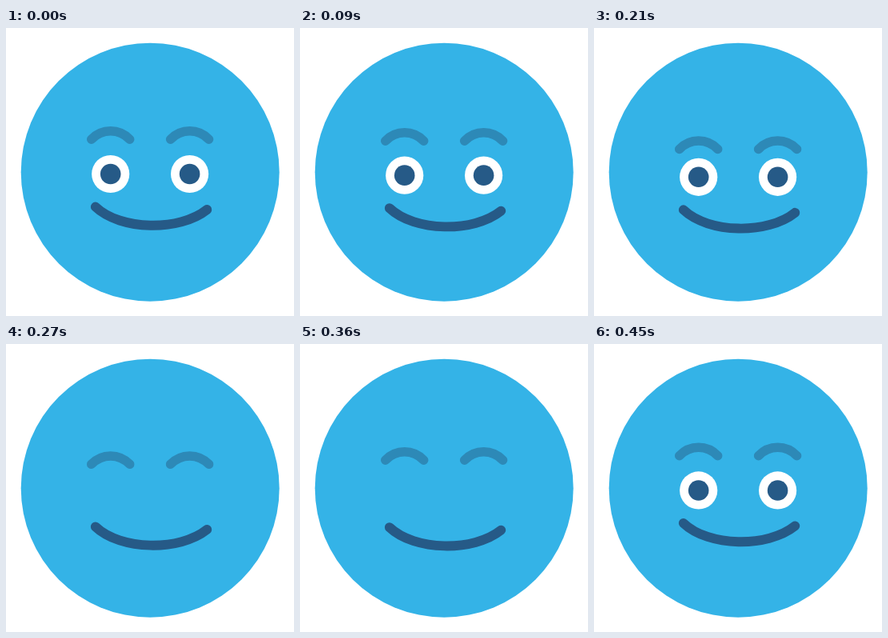
Animation of 360 by 360 pixels, one loop 480 ms. Source, as an HTML page:

```html
<!DOCTYPE html>
<html lang="en">
<head>
<meta charset="utf-8">
<title>Blinking smile</title>
<style>
html, body { margin: 0; width: 100%; height: 100%; overflow: hidden; background: #fff; }
svg { display: block; width: 100%; height: 100%; }
.line { fill: none; stroke-linecap: round; }
</style>
</head>
<body>
<svg viewBox="0 0 360 360">
  <defs>
    <path id="brow" d="M-24 139.2C-10.5 125.4 10.5 125.4 24 139.2"/>
    <g id="eye">
      <circle cy="182.5" r="23.6" fill="#fff"/>
      <circle cy="182.5" r="12.8" fill="#265a87"/>
    </g>
  </defs>
  <circle cx="180.2" cy="180.2" r="161.5" fill="#34b3e7"/>
  <g id="brows" class="line" stroke="#2d89b7" stroke-width="11.5">
    <use href="#brow" x="130.7"/>
    <use href="#brow" x="229.6"/>
  </g>
  <g id="eyes">
    <use href="#eye" x="130.7"/>
    <use href="#eye" x="229.6"/>
  </g>
  <path id="mouth" class="line" stroke="#265a87" stroke-width="11.9" d="M111.8 223.5C143 253.3 217 254.5 251.3 227"/>
</svg>
<script>
const LOOP = 480, STEP = 30;
const LOW = 330, REST = 455;
const [brows, eyes, mouth] = ["brows", "eyes", "mouth"].map(id => document.getElementById(id));

// The face sinks steadily, then springs back with acceleration
function sink(t) {
  if (t < LOW) return 6 * t / LOW;
  const u = Math.min(1, (t - LOW) / (REST - LOW));
  return 6 * (1 - u * u);
}

// The brows dip further just before the eyes close
const dip = t => 8.8 * Math.exp(-(((t - 226) / 75) ** 2));

function shift(el, y) {
  el.setAttribute("transform", `translate(0 ${y.toFixed(2)})`);
}

function draw(now) {
  const t = Math.floor((now % LOOP) / STEP) * STEP;
  const y = sink(t);
  shift(mouth, y);
  shift(eyes, y);
  shift(brows, y + dip(t));
  const shut = t >= 270 && t < 390;
  eyes.setAttribute("visibility", shut ? "hidden" : "visible");
}

let start = null;
function tick(now) {
  if (start === null) start = now;
  draw(now - start);
  requestAnimationFrame(tick);
}
draw(0);
requestAnimationFrame(tick);
</script>
</body>
</html>
```
